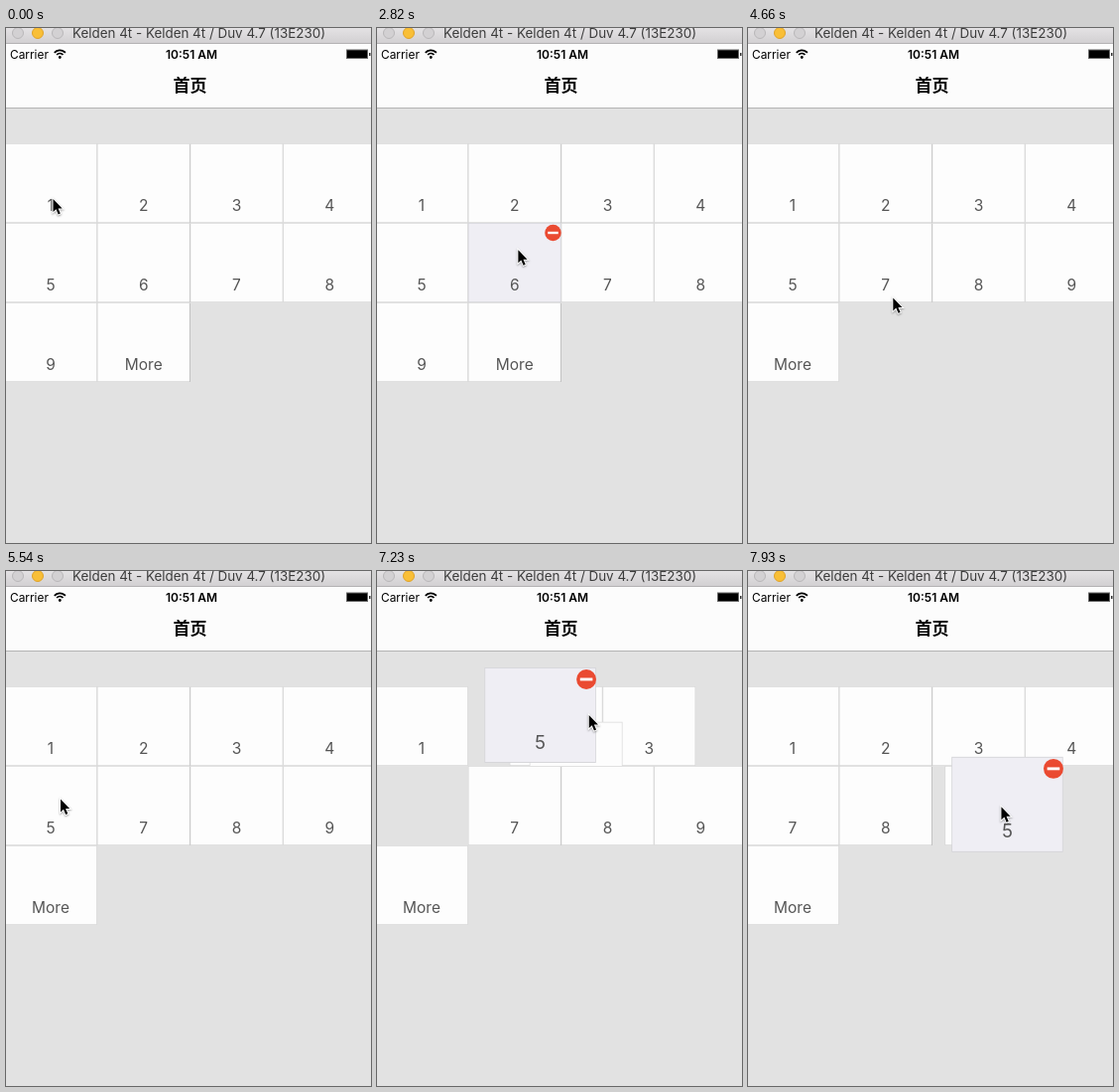
An HTML page with a canvas that plays this animation: 368x518 px, repeating every 8 s.

```html
<!DOCTYPE html>
<html lang="zh">
<head>
<meta charset="utf-8">
<style>
html, body { margin: 0; width: 100%; height: 100%; overflow: hidden; background: #e2e2e2; }
canvas { display: block; }
</style>
</head>
<body>
<canvas id="stage" width="368" height="518"></canvas>
<script>
const ctx = document.getElementById('stage').getContext('2d');
const LOOP = 8000, TICK = 88.1;
const PITCH = 93.75, ROW = 80, LEFT = -1.9, TOP = 116;
const SLIDE = 2.8;                   // length of a grid or scale tween, in ticks
const FONT = 'Inter, "Noto Sans", sans-serif';
const TILES = [...'123456789M'];     // M is the "More" tile

// Tiles taken out of the grid, and put back at a slot
const MOVES = [
  { at: 46.23, id: '6' },
  { at: 80.7, id: '5', slot: 1 },
  { at: 83.8, id: '5', slot: 2 },
  { at: 86.4, id: '5', slot: 7 },
  { at: 89.35, id: '5', slot: 6 }
];
let order = TILES;
for (const move of MOVES) {
  order = order.filter(id => id !== move.id);
  if (move.slot) order.splice(move.slot, 0, move.id);
  move.order = order;
}

// Each leg takes the pointer to x, y, bowing out by dx, dy on the way.
const LEGS = [
  { from: 4, to: 10, x: 122, y: 231 },
  { from: 27, to: 39, x: 173.5, y: 206.5 },
  { from: 50, to: 60, x: 43, y: 253, dy: 85 },
  { from: 60, to: 63, x: 54, y: 228 },
  { from: 77, to: 84, x: 252, y: 162, dy: -54 },
  { from: 84, to: 90.5, x: 252, y: 237, dx: 46 }
];

const mix = (a, b, p) => a + (b - a) * p;
const ease = v => (v = Math.min(1, Math.max(0, v)), v * v * (3 - 2 * v));
const tween = (t, start) => ease((t - start) / SLIDE);

function pointerAt(t) {
  let px = 46.5, py = 170.5;
  for (const { from, to, x, y, dx = 0, dy = 0 } of LEGS) {
    const p = ease((t - from) / (to - from)), bow = Math.sin(Math.PI * p);
    px = mix(px, x, p) + dx * bow;
    py = mix(py, y, p) + dy * bow;
  }
  return [px, py];
}

// The dragged tile trails one tick behind the pointer.
function dragAt(t) {
  const [x, y] = pointerAt(t - 1);
  return [x - 9.5, y + 8];
}

const slotAt = i => [LEFT + PITCH * (i % 4 + .5), TOP + ROW * ((i >> 2) + .5)];

function place(id, t) {
  let [x, y] = slotAt(TILES.indexOf(id));
  for (const { at, order } of MOVES) {
    if (!order.includes(id)) break;
    const [sx, sy] = slotAt(order.indexOf(id)), p = tween(t, at);
    x = mix(x, sx, p);
    y = mix(y, sy, p);
  }
  return [x, y];
}

function box(color, x, y, w, h) {
  ctx.fillStyle = color;
  ctx.fillRect(x, y, w, h);
}

function disc(x, y, r, fill, stroke) {
  ctx.beginPath();
  ctx.arc(x, y, r, 0, 7);
  ctx.fillStyle = fill;
  ctx.fill();
  if (stroke) {
    ctx.strokeStyle = stroke;
    ctx.lineWidth = 1;
    ctx.stroke();
  }
}

function label(str, x, y, font, color, align = 'center') {
  ctx.font = font;
  ctx.fillStyle = color;
  ctx.textAlign = align;
  ctx.fillText(str, x, y);
}

function header() {
  const bar = ctx.createLinearGradient(0, 0, 0, 15);
  bar.addColorStop(0, '#e4e2e4');
  bar.addColorStop(1, '#d2d0d2');
  box(bar, 0, 0, 368, 15);
  box('#b4b2b4', 0, 15, 368, 1);
  ['#d3d1d3', '#f9bf37', '#d3d1d3'].forEach((color, i) =>
    disc(12 + 20 * i, 5, 5.5, color, i === 1 ? '#e0a32a' : '#b9b7b9'));
  label('Kelden 4t - Kelden 4t / Duv 4.7 (13E230)', 67, 10, '13.4px ' + FONT, '#3c3c3c', 'left');

  box('#fcfcfc', 0, 16, 368, 64);
  box('#b4b4b4', 0, 80, 368, 1);
  label('Carrier', 4, 30.5, '11.9px ' + FONT, '#000', 'left');
  label('10:51 AM', 187, 30.5, '600 12px ' + FONT, '#000');
  disc(54.3, 29.5, 1.4, '#000');
  ctx.strokeStyle = '#000';
  ctx.lineWidth = 1.7;
  for (const r of [4.2, 7.4]) {
    ctx.beginPath();
    ctx.arc(54.3, 29.8, r, -Math.PI * .77, -Math.PI * .23);
    ctx.stroke();
  }
  box('#666', 343, 21.5, 22, 9.5);
  box('#000', 344, 22.5, 20, 7.5);
  box('#333', 366, 25, 1.5, 3);
  label('首页', 185.5, 64, 'bold 17px "Noto Sans CJK SC", "Noto Sans CJK", sans-serif', '#000');
}

const LOOKS = {
  plain: ['#d9d9d9', '#fdfdfd'],
  pressed: ['#7e7e7e', '#888'],
  lifted: ['#d6d6da', '#efeef4']
};

function tile(id, [x, y], look, scale = 1) {
  const [edge, fill] = LOOKS[look];
  ctx.save();
  ctx.translate(x, y);
  ctx.scale(scale, scale);
  box(edge, -PITCH / 2, -ROW / 2, PITCH, ROW);
  box(fill, -PITCH / 2 + .7, -ROW / 2 + .8, PITCH - 1.4, ROW - 1.6);
  label(id === 'M' ? 'More' : id, 0, 28, '15.5px ' + FONT, '#555');
  if (look === 'lifted') {
    disc(38.75, -30, 8.3, '#ea4a31');
    box('#fff', 33.5, -31.2, 10.5, 2.4);
  }
  ctx.restore();
  // the middle grid line falls on a whole pixel and looks darker
  if (look === 'plain' && Math.abs(x - slotAt(1)[0]) < 1) box('#c2c2c2', 185, y - 39, 1, 79);
}

function pointer(t) {
  const [x, y] = pointerAt(t);
  const arrow = new Path2D('M0 0V13L3 10.2 5.2 15.4 7.3 14.5 5.1 9.5H9.2Z');
  ctx.save();
  ctx.translate(x + 1, y + 1.5);
  ctx.shadowColor = 'rgba(0,0,0,.35)';
  ctx.shadowBlur = 2;
  ctx.shadowOffsetY = 1;
  ctx.strokeStyle = '#fff';
  ctx.lineWidth = 2;
  ctx.stroke(arrow);
  ctx.shadowColor = 'transparent';
  ctx.fillStyle = '#000';
  ctx.fill(arrow);
  ctx.restore();
}

function draw(t) {
  box('#e2e2e2', 0, 0, 368, 518);
  header();
  const active = t >= 70 ? '5' : t >= 18 ? '6' : '';
  const lifted = t >= 76 || t >= 23 && t < 46;
  for (const id of TILES) {
    if (id === active && lifted || id === '6' && t >= 46) continue;
    tile(id, place(id, t), id === active ? 'pressed' : 'plain');
  }
  if (lifted) {
    const grow = active === '5' ? tween(t, 75.05) : tween(t, 22.05) - tween(t, 27.1);
    tile(active, active === '5' ? dragAt(t) : place('6', t), 'lifted', 1 + .2 * grow);
  }
  pointer(t);
}

function run(now) {
  draw(Math.floor((now % LOOP + 14) / TICK));
  requestAnimationFrame(run);
}
requestAnimationFrame(run);
</script>
</body>
</html>
```
